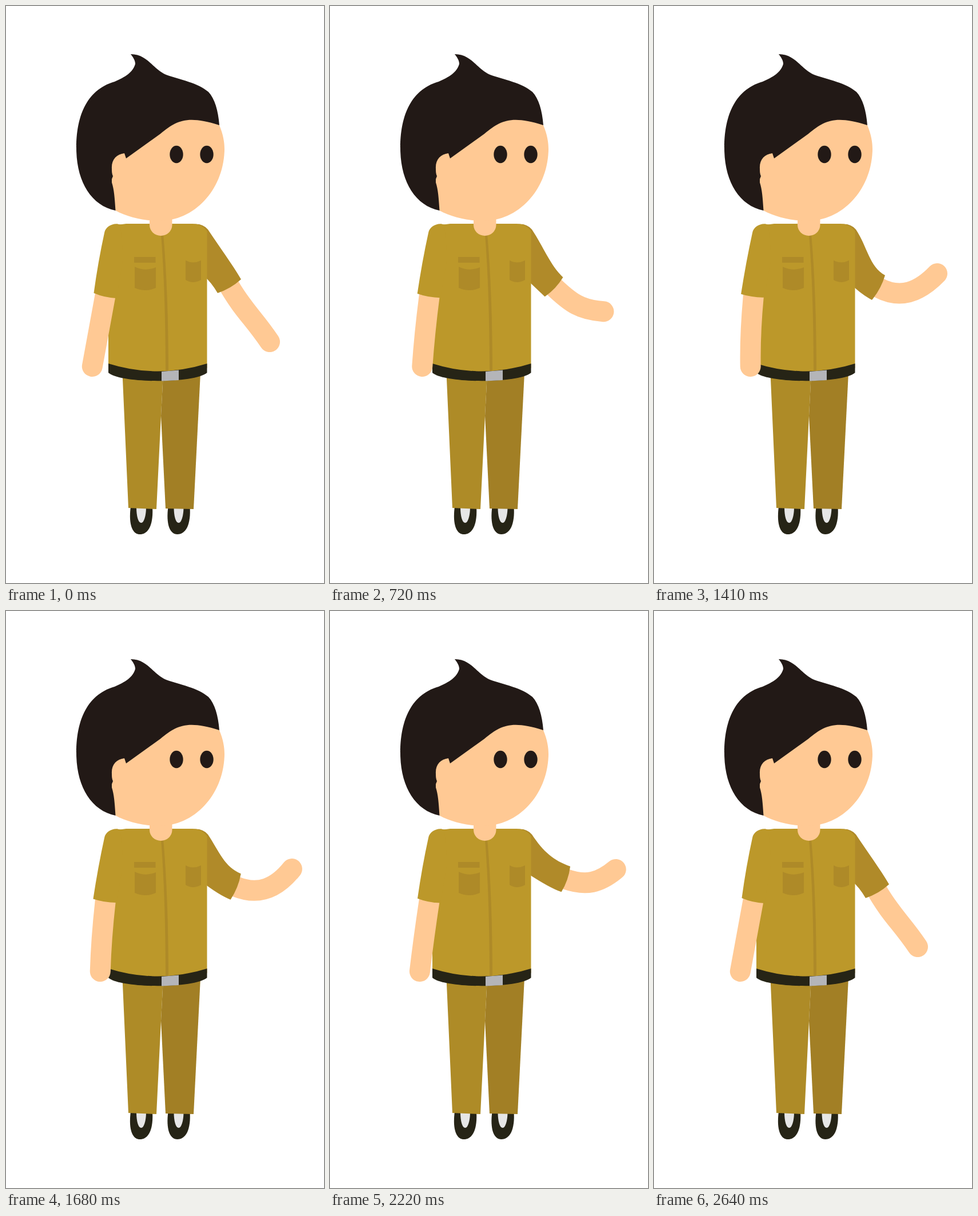
Recreate the animation shown at these times as an HTML page. Size 556 px wide and 1007 px high, loop 2.67 s.

```html
<!DOCTYPE html>
<html lang="en">
<head>
<meta charset="utf-8">
<title>Presenter</title>
<style>
html, body { margin: 0; width: 100%; height: 100%; overflow: hidden; background: #fff; }
svg { display: block; width: 100%; height: 100%; }
.skin { fill: #ffc994; }
.arm { fill: none; stroke: #ffc994; stroke-width: 36; stroke-linecap: round; }
.hair { fill: #221916; }
.shirt { fill: #bc982a; }
.shade { fill: #ae8a28; }
.black { fill: #262416; }
</style>
</head>
<body>
<svg viewBox="0 0 556 1007">
  <defs>
    <g id="shoe">
      <path class="black" d="M218 874C214 905 221 922 234 922C249 922 258 905 256 874Z"/>
      <path fill="#e6e6e6" d="M228 874H245C245 890 241 902 236.500 902C231 902 228 890 228 874Z"/>
    </g>
  </defs>

  <use href="#shoe"/>
  <use href="#shoe" x="65.500"/>
  <path fill="#ae8b27" d="M203.500 640H275L271 715L263 878L214 876Z"/>
  <path fill="#a27f25" d="M275 640H340L328 878L279 877L271 715Z"/>

  <path id="farArm" class="arm"/>
  <path id="farSleeve" fill="#b08a29"/>

  <path class="shirt" d="M179 400L192 381Q198 382 210 380H326Q342 380 351.500 393V632Q265 658 179 632Z"/>
  <path class="shade" d="M271 398H275Q284 500 284 642H279Q279 500 271 398Z"/>
  <path class="shade" d="M224 438H261.500V448H224Z"/>
  <path class="shade" d="M225 455Q243 464 262 456V492Q243 500 225 492Z"/>
  <path class="shade" d="M314 444Q327 451 341 444V478Q327 486 314 478Z"/>
  <path class="black" d="M179 624Q265 651 351.500 624V640C330 659 200 659 179 640Z"/>
  <path fill="#b4b5b9" d="M272 638L302 635.500V653L272 654.500Z"/>

  <path id="nearArm" class="arm"/>
  <path id="nearSleeve" class="shirt"/>

  <path class="skin" d="M251 360V382A19.700 19 0 0 0 290.500 382V360Z"/>
  <path class="hair" d="M191.500 357C148 348 123 305 123 248C123 197 138 147 190 132C208 124 222 116 226 101C226 95 222 89 218 84C247 84 256 109 280 120C306 129 335 134 354 150C365 162 371 182 373 208Z"/>
  <path class="skin" d="M210 266L270 223C298 200 316 190 373 208C380 225 382 238 382 250C381 320 330 375 268 375C240 375 212 368 191.500 357C190 335 189 320 185 308V302L187 297C185 293 185 288 185 284C184 268 193 259 207 257Z"/>
  <ellipse class="hair" cx="298" cy="259" rx="11.700" ry="15.200"/>
  <ellipse class="hair" cx="351" cy="259" rx="11.700" ry="15.200"/>
</svg>
<script>
const LOOP = 2670, STEP = 30, END = LOOP - STEP;

// joints of the far arm; turn is the direction of the hand in degrees
const rest = { outer: [411, 477], inner: [370, 501], pit: [345, 470], hand: [461, 586], turn: [56] };
const offer = { outer: [404, 470], inner: [381, 513], pit: [345, 486], hand: [495, 467], turn: [-46] };
const raise = { outer: [422, 439], inner: [412, 488], pit: [345, 455], hand: [508, 422], turn: [-60] };

// sag lets the hand hang a little on its way
const MOVES = [
  { from: rest, to: offer, start: 0, end: 1410, sag: 8 },
  { from: offer, to: raise, start: 1410, end: 2130, sag: 0 },
  { from: raise, to: rest, start: 2130, end: END, sag: 0 }
];

const mix = (a, b, k) => a + (b - a) * k;
const along = ([x, y], angle, d) => [x + d * Math.cos(angle), y + d * Math.sin(angle)];
const draw = (id, d) => document.getElementById(id).setAttribute("d", d);

function poseAt(t) {
  const { from, to, start, end, sag } = MOVES.find(m => t <= m.end);
  const k = (t - start) / (end - start);
  const pose = {};
  for (const joint in from) pose[joint] = from[joint].map((v, i) => mix(v, to[joint][i], k));
  pose.hand[1] += sag * Math.sin(Math.PI * k);
  return pose;
}

// sleeve and forearm both leave the cuff at a right angle to it
function drawFar(t) {
  const { outer, inner, pit, hand, turn } = poseAt(t);
  const cuff = outer.map((v, i) => (v + inner[i]) / 2);
  const tilt = Math.atan2(outer[0] - inner[0], inner[1] - outer[1]);
  const reach = 0.42 * Math.hypot(hand[0] - cuff[0], hand[1] - cuff[1]);
  const wrist = along(hand, turn[0] * Math.PI / 180, -reach);
  draw("farArm", `M${cuff}C${along(cuff, tilt, reach)} ${wrist} ${hand}`);
  draw("farSleeve", `M325 381Q343 378 353 390C373 420 ${along(outer, tilt, -31)} ${outer}` +
    `Q${along(cuff, tilt, 5)} ${inner}Q${along(inner, tilt, -22)} ${pit}L325 400Z`);
}

function drawNear(t) {
  const k = 1 - Math.abs(2 * t / END - 1);
  draw("nearArm", `M174.500 500Q${mix(162.700, 168, k)} ${mix(564.500, 570, k)} ${mix(150.800, 170, k)} 629`);
  draw("nearSleeve", `M200 382C190 377 174 384 172 396Q161 446 ${mix(153.500, 152, k)} ${mix(501, 503, k)}` +
    `Q172 509 193 ${mix(510, 508.500, k)}L205 440Z`);
}

function frame(now) {
  const t = Math.min(END, Math.floor((now % LOOP) / STEP) * STEP);
  drawFar(t);
  drawNear(t);
  requestAnimationFrame(frame);
}
frame(0);
</script>
</body>
</html>
```
